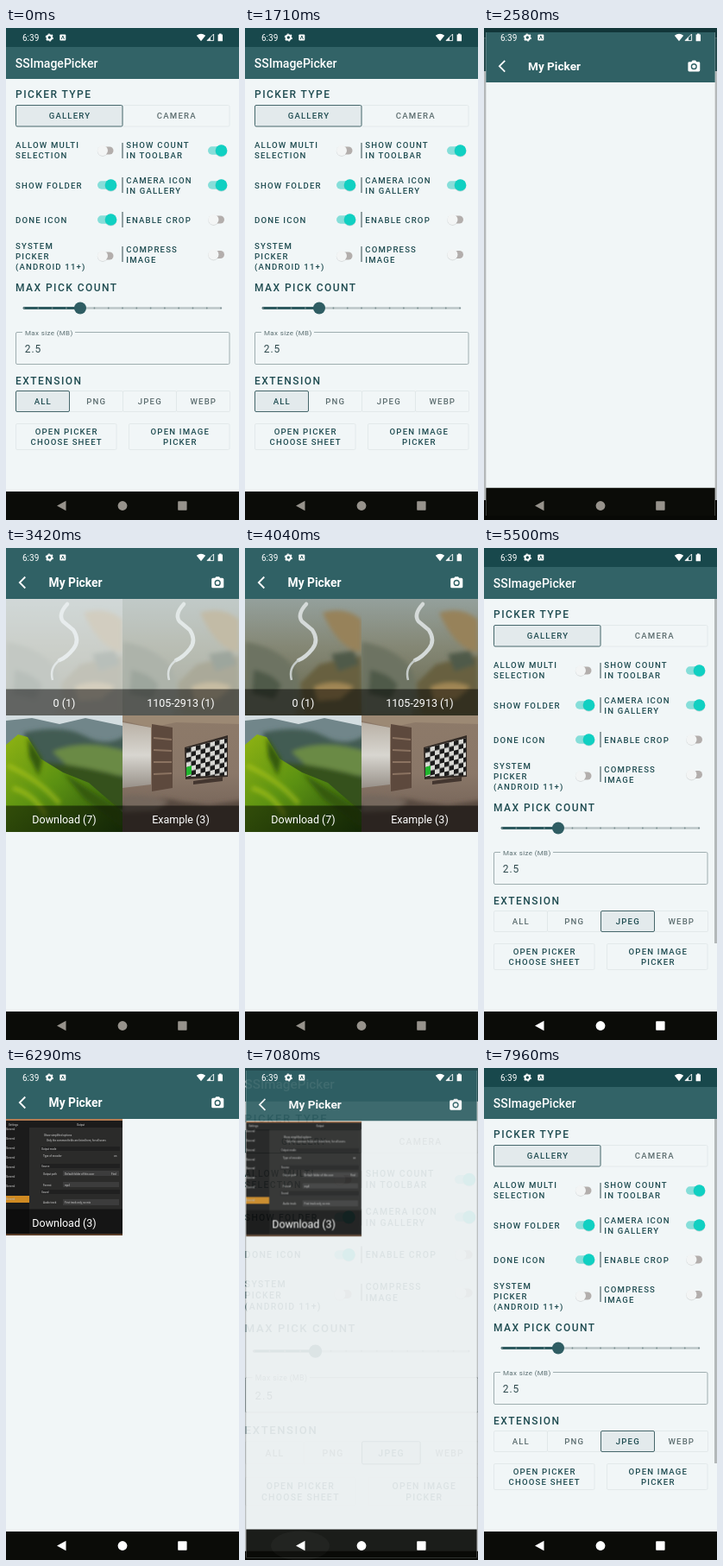
An HTML page for the animation above (8 s loop, 270 by 570 pixels).

```html
<!DOCTYPE html>
<html lang="en">
<head>
<meta charset="utf-8">
<title>SSImagePicker</title>
<style>
html, body { margin: 0; width: 100%; height: 100%; overflow: hidden; background: #0b0c08; }
svg { display: block; width: 100%; height: 100%; font-family: Roboto, sans-serif; }
.anim { animation: 8s linear infinite; }
.window { transform-origin: 135px 285px; }
.heading { font-size: 12px; font-weight: 500; letter-spacing: 1.45px; fill: #1f4c51; }
.label { font-size: 9.6px; font-weight: 500; letter-spacing: 1.17px; fill: #1f4c51; }
.mid { text-anchor: middle; }
.muted { fill: #5c6d6f; }
.title { font-size: 14px; font-weight: 500; fill: #fff; }
.caption { font-size: 12.5px; fill: #fff; text-anchor: middle; }
.tiny { font-size: 3px; font-weight: 500; fill: #b4b4b4; }

#settings { animation-name: settings; }
#picker { animation-name: picker; }
.shown { animation-name: shown; }
#all { animation-name: all; }
#jpeg { animation-name: jpeg; }
#bar { animation-name: bar; }
#nav { animation-name: nav; }
#ripple { animation-name: ripple; }
#first { animation-name: first; }
#second { animation-name: second; }
#photo0 { animation-name: photo0; }
#photo1 { animation-name: photo1; }
#photo2, #photo3 { animation-name: photo2; }
#photo4 { animation-name: photo4; }

/* Window motion: a short slow-in part, then a long slow-out part. */
@keyframes settings {
  0% { transform: scale(1); }
  30.5%, 73.125% { transform: scale(1); animation-timing-function: cubic-bezier(.3,0,.8,.15); }
  31.333%, 73.958% { transform: scale(1.018); animation-timing-function: cubic-bezier(.05,.7,.1,1); }
  35.5%, 54.74%, 78.125%, 87.99% { transform: scale(1.045); }
  54.75%, 88% { transform: scale(1.1); animation-timing-function: cubic-bezier(.3,0,.8,.15); }
  55.583%, 88.833% { transform: scale(1.06); animation-timing-function: cubic-bezier(.05,.7,.1,1); }
  59.75%, 93%, 100% { transform: scale(1); }
}
@keyframes picker {
  0% { transform: scale(.85); }
  30.5%, 73.125% { transform: scale(.85); animation-timing-function: cubic-bezier(.3,0,.8,.15); }
  31.333%, 73.958% { transform: scale(.91); animation-timing-function: cubic-bezier(.05,.7,.1,1); }
  35.5%, 78.125% { transform: scale(1); }
  54.75%, 88% { transform: scale(1); animation-timing-function: cubic-bezier(.3,0,.8,.15); }
  55.583%, 88.833% { transform: scale(.96); animation-timing-function: cubic-bezier(.05,.7,.1,1); }
  59.75%, 93%, 100% { transform: scale(.9); }
}
@keyframes shown {
  0%, 31.1%, 55.85%, 73.75%, 89.1%, 100% { opacity: 0; }
  31.75%, 55.2%, 74.4%, 88.45% { opacity: 1; }
}
@keyframes all { 0%, 65.5% { opacity: 1; } 66.8%, 100% { opacity: 0; } }
@keyframes jpeg { 0%, 65.5% { opacity: 0; } 66.8%, 100% { opacity: 1; } }
@keyframes bar {
  0%, 54.7%, 73%, 88% { opacity: 0; }
  55%, 70%, 88.3%, 100% { opacity: 1; }
}
@keyframes nav { 0%, 51.8% { fill: #97938c; } 53%, 100% { fill: #fff; } }
@keyframes ripple {
  0%, 51.6%, 55.5%, 84.9%, 88.8%, 100% { opacity: 0; }
  52.8%, 54%, 86.1%, 87.3% { opacity: .16; }
}
@keyframes first { 0%, 36.9%, 57.1%, 100% { opacity: 0; } 37%, 57% { opacity: 1; } }
@keyframes second { 0%, 76.1% { opacity: 0; } 76.2%, 100% { opacity: 1; } }
@keyframes photo0 { 0%, 41% { opacity: 0; } 46%, 100% { opacity: 1; } }
@keyframes photo1 { 0%, 40.7% { opacity: 0; } 44.7%, 100% { opacity: 1; } }
@keyframes photo2 { 0%, 37.5% { opacity: 0; } 41%, 100% { opacity: 1; } }
@keyframes photo4 { 0%, 76.2% { opacity: 0; } 78.3%, 100% { opacity: 1; } }
</style>
</head>
<body>
<svg viewBox="0 0 270 570" preserveAspectRatio="none">
  <defs>
    <linearGradient id="haze" x2="0" y2="1">
      <stop stop-color="#94a09c"/><stop offset=".4" stop-color="#858876"/><stop offset="1" stop-color="#66664c"/>
    </linearGradient>
    <linearGradient id="grass" x2="1" y2="1">
      <stop stop-color="#8fb313"/><stop offset=".45" stop-color="#5c9212"/><stop offset="1" stop-color="#28500d"/>
    </linearGradient>
    <linearGradient id="wall" x2="0" y2="1">
      <stop stop-color="#8d7a69"/><stop offset=".5" stop-color="#8a7768"/><stop offset="1" stop-color="#6a5a50"/>
    </linearGradient>
    <linearGradient id="window" x2="0" y2="1">
      <stop stop-color="#b9b1a6"/><stop offset=".5" stop-color="#d8d6d0"/><stop offset="1" stop-color="#989189"/>
    </linearGradient>
    <pattern id="checks" width="11" height="11" patternUnits="userSpaceOnUse">
      <path fill="#d8d8d4" d="M0 0h11v11H0z"/><path fill="#1b1b1b" d="M0 0h5.5v5.5H0zM5.5 5.5h5.5v5.5H5.5z"/>
    </pattern>
    <filter id="soft" x="-10%" y="-10%" width="120%" height="120%"><feGaussianBlur stdDeviation="2.5"/></filter>
    <clipPath id="cell"><path d="M0 0h135v135H0z"/></clipPath>
    <g id="valley">
      <path fill="url(#haze)" d="M0 0h135v135H0z"/>
      <g filter="url(#soft)">
        <path fill="#6d7362" d="M0 50Q30 54 50 72T58 135H0z"/>
        <path fill="#97825a" d="M90 16Q116 8 135 24V62Q108 58 90 16z"/>
        <path fill="#67613f" d="M135 66Q108 70 86 76L64 98 70 135H135z"/>
        <path fill="#4f5a4a" d="M10 82Q32 86 42 100L34 116 8 110zM100 64L126 60 132 76 108 84z"/>
        <path fill="#a28754" d="M80 102Q104 92 126 102L110 116 84 118z"/>
      </g>
      <path fill="none" stroke="#d5dad9" stroke-width="4.5" stroke-linecap="round" stroke-linejoin="round" d="M71 6Q60 18 66 26L78 36Q86 48 78 58T62 71"/>
      <path fill="none" stroke="#c5cbc8" stroke-width="2.5" d="M62 71Q50 80 54 94"/>
    </g>
    <g id="hill">
      <path fill="#d3dde0" d="M0 0h135v135H0z"/>
      <path fill="#71868a" d="M0 6L30 3 62 10 92 3 135 12V60H0z"/>
      <g filter="url(#soft)">
        <path fill="#435c52" d="M20 20Q66 10 92 24T140 22V90H40z"/>
        <path fill="#6b8a45" d="M54 42Q90 26 140 42V70L80 66z"/>
        <path fill="#34511f" d="M46 54Q90 58 140 72V112H60z"/>
      </g>
      <path fill="url(#grass)" d="M0 34L14 22 25 25 40 50 66 66 96 78 135 112V135H0z"/>
      <g filter="url(#soft)">
        <path fill="#345a10" d="M25 25L42 51 38 70 27 48zM66 66L135 112V130L90 96z"/>
        <path fill="none" stroke="#b6cc1e" stroke-width="5" opacity=".6" d="M2 58Q38 74 62 102M8 84Q34 92 46 116"/>
      </g>
    </g>
    <g id="room">
      <path fill="url(#wall)" d="M0 0h135v135H0z"/>
      <path fill="#9c8974" d="M0 0H135V10L62 8 34 14 0 6z"/>
      <path fill="url(#window)" d="M0 8L33 14V80L0 84z"/>
      <path fill="#5d493d" d="M34 10L58 14V84L34 88z"/>
      <path stroke="#8b7361" stroke-width="2" d="M36 26L57 28M36 40L57 41M36 54H57M36 68L57 67"/>
      <path fill="#322a25" d="M72 37L122 23V71L73 74z"/>
      <g transform="matrix(1 -.25 0 1 74 38)"><path fill="url(#checks)" d="M0 0H47V43L0 33z"/></g>
      <path fill="#20b52d" d="M74 60L80 58V68L74 70z"/>
      <path fill="#43362f" d="M82 76L116 71V76L82 80z"/>
      <g filter="url(#soft)">
        <path fill="#57493f" d="M-5 104Q30 90 68 100L100 104 140 98V140H-5z"/>
        <path fill="#75675d" d="M0 94Q24 90 54 100L38 110 0 112z"/>
      </g>
    </g>
    <g id="screen">
      <path fill="#2b2b2a" d="M0 0h135v135H0z"/>
      <path fill="#1b1b1b" d="M0 2H135V10H0zM0 10H27V133H0z"/>
      <path fill="#202020" d="M40 32H132V37H40zM40 52H132V57H40zM40 82H132V87H40z"/>
      <path fill="#3c3c3c" d="M66 60H131V66H66zM66 73H131V79H66zM66 93H131V100H66z"/>
      <path fill="#cf8a22" d="M0 89H27V97H0z"/>
      <path fill="#b47a50" d="M0 0H135V2H0zM0 133H135V135H0z"/>
      <g id="rows"></g>
    </g>
  </defs>

  <g id="settings" class="anim window">
    <path fill="#f1f6f7" d="M0 0H270V570H0z"/>
    <path fill="#18484c" d="M0 0H270V22H0z"/>
    <path fill="#326367" d="M0 22H270V59H0z"/>
    <path fill="#0b0c08" d="M0 537H270V570H0z"/>
    <text class="title" x="10.8" y="45.5">SSImagePicker</text>
    <g id="form"></g>
    <g id="all" class="anim"></g>
    <g id="jpeg" class="anim"></g>
    <path id="bar" class="anim" fill="#b3b8b9" d="M267 59H270V458H267z"/>
  </g>

  <path class="anim shown" fill-opacity=".25" d="M0 0H270V570H0z"/>

  <g class="anim shown"><g id="picker" class="anim window">
    <path fill="#f1f6f7" d="M0 0H270V570H0z"/>
    <path fill="#306165" d="M0 0H270V59H0z"/>
    <path fill="#0b0c08" d="M0 537H270V570H0z"/>
    <path fill="none" stroke="#fff" stroke-width="1.8" d="M22.3 33.5L15.8 40L22.3 46.5"/>
    <text class="title" x="49.6" y="45" style="font-weight:700;font-size:13.8px">My Picker</text>
    <path fill="#fff" d="M239.7 34.8H242.2L243.5 33.2H247L248.3 34.8H250.8Q252.3 34.8 252.3 36.3V44.8Q252.3 46.3 250.8 46.3H239.7Q238.2 46.3 238.2 44.8V36.3Q238.2 34.8 239.7 34.8z"/>
    <circle cx="245.2" cy="40.4" r="2.9" fill="#fff" stroke="#306165" stroke-width="1.4"/>
    <g id="first" class="anim"></g>
    <g id="second" class="anim"></g>
  </g></g>

  <g fill="#fff">
    <text x="19" y="14.7" font-size="10">6:39</text>
    <circle cx="50.3" cy="11" r="2.7" fill="none" stroke="#fff" stroke-width="2"/>
    <circle cx="50.3" cy="11" r="4" fill="none" stroke="#fff" stroke-width="1.2" stroke-dasharray="2 2.19"/>
    <rect x="62.3" y="7.5" width="7" height="7" rx="1"/>
    <path fill="none" stroke="#255559" d="M64.2 13L65.8 9L67.4 13"/>
    <path d="M220.8 8.8Q226 4.6 231.2 8.8L226 15.2z"/>
    <path fill="none" stroke="#fff" stroke-width=".9" d="M233 14.6L240.6 7V14.6z"/>
    <path d="M233 14.6L237 10.6V14.6zM245.6 7.5H247V6.4H249.6V7.5H251V15.2H245.6z"/>
  </g>
  <ellipse id="ripple" class="anim" cx="64" cy="553.5" rx="34" ry="17" fill="#fff" opacity="0"/>
  <g id="nav" class="anim">
    <path d="M59 553.5L69.5 547.8V559.2z"/>
    <circle cx="135" cy="553.5" r="5.4"/>
    <rect x="199.2" y="548.3" width="10.4" height="10.4" rx=".8"/>
  </g>
</svg>
<script>
const fill = (id, parts) => document.getElementById(id).innerHTML = parts.join('');
const text = (cls, x, y, str) => `<text class="${cls}" x="${x}" y="${y}">${str}</text>`;
const lines = (cls, x, y, ...rows) => rows.map((row, i) => text(cls, x, y + i * 12, row)).join('');
const box = (x, y, w, h, paint, stroke) =>
  `<rect x="${x}" y="${y}" width="${w}" height="${h}" rx="1.5" fill="${paint}" stroke="${stroke}" stroke-width=".9"/>`;
const faint = '#e1e8e9', dark = '#34595d', picked = '#e3eaec';

const toggle = (x, y, on) => on
  ? `<rect x="${x - 15}" y="${y - 4.7}" width="20" height="9.4" rx="4.7" fill="#86ded9"/>
     <circle cx="${x + .5}" cy="${y + .6}" r="7" fill="#98b4b5" opacity=".5"/><circle cx="${x + .5}" cy="${y}" r="6.8" fill="#10d0c2"/>`
  : `<rect x="${x - 5}" y="${y - 4.6}" width="16" height="9.2" rx="4.6" fill="#b3aeac"/>
     <circle cx="${x - 1.5}" cy="${y + .7}" r="6.2" fill="#9a9a9a" opacity=".3"/><circle cx="${x - 1.5}" cy="${y}" r="6" fill="#f3f5f5"/>`;

const extensions = ['ALL', 'PNG', 'JPEG', 'WEBP'];
const extension = (i, cls, paint, stroke) =>
  box(11.5 + i * 62, 420.5, 62, 24, paint, stroke) + text(`label mid ${cls}`, 42.8 + i * 62, 436, extensions[i]);

const ticks = Array.from({ length: 15 }, (_, i) =>
  `<circle cx="${21 + i * 16.29}" cy="324.5" r=".9" fill="#7d9194"/>`);

fill('form', [
  text('heading', 11, 81.3, 'PICKER TYPE'),
  text('heading', 11, 304.5, 'MAX PICK COUNT'),
  text('heading', 11, 412.5, 'EXTENSION'),
  box(135, 89.5, 124, 24.5, 'none', faint),
  box(11.5, 89.5, 123.5, 24.5, picked, dark),
  text('label mid', 74, 105.2, 'GALLERY'),
  text('label mid muted', 197.8, 105.2, 'CAMERA'),
  lines('label', 11, 139.3, 'ALLOW MULTI', 'SELECTION'),
  lines('label', 11, 185.7, 'SHOW FOLDER'),
  lines('label', 11, 225.7, 'DONE ICON'),
  lines('label', 11, 256.3, 'SYSTEM', 'PICKER', '(ANDROID 11+)'),
  lines('label', 139.3, 139.3, 'SHOW COUNT', 'IN TOOLBAR'),
  lines('label', 139.3, 179.7, 'CAMERA ICON', 'IN GALLERY'),
  lines('label', 139.3, 225.7, 'ENABLE CROP'),
  lines('label', 139.3, 259.7, 'COMPRESS', 'IMAGE'),
  ...[133, 173, 213, 253].map(y => `<path fill="#66797b" d="M134.3 ${y}h1.4v18h-1.4z"/>`),
  toggle(113.5, 142), toggle(121, 182, true), toggle(121, 222, true), toggle(113.5, 264),
  toggle(249, 142, true), toggle(249, 182, true), toggle(242, 222), toggle(242, 262.5),
  '<path stroke="#bcc6c8" stroke-width="2.6" stroke-linecap="round" d="M21 324.5H249"/>',
  '<path stroke="#2d5a5f" stroke-width="2.8" stroke-linecap="round" d="M21 324.5H86"/>',
  ...ticks,
  '<circle cx="86" cy="324.5" r="7" fill="#2f5d63"/>',
  box(11.5, 352.5, 247.5, 37, 'none', '#96a5a7'),
  '<path fill="#f1f6f7" d="M19 350H80V355H19z"/>',
  '<text x="22" y="355.8" font-size="8" letter-spacing=".35" fill="#5c7073">Max size (MB)</text>',
  '<text x="21.7" y="375.8" font-size="12" letter-spacing="1" fill="#2f4a4e">2.5</text>',
  ...extensions.map((_, i) => extension(i, 'muted', 'none', faint)),
  box(11.5, 458.5, 116.5, 30, 'none', faint),
  box(142.5, 458.5, 116.5, 30, 'none', faint),
  lines('label mid', 70.2, 471.3, 'OPEN PICKER', 'CHOOSE SHEET'),
  lines('label mid', 201.8, 471.3, 'OPEN IMAGE', 'PICKER')
]);
fill('all', [extension(0, '', picked, dark)]);
fill('jpeg', [extension(2, '', picked, dark)]);

const folder = (i, col, row, photo, name) => `<g transform="translate(${col * 135} ${59 + row * 135})">
  <g clip-path="url(#cell)"><use id="photo${i}" class="anim" href="#${photo}"/></g>
  <path fill-opacity=".5" d="M0 104.5H135V135H0z"/>${text('caption', 67.5, 125, name)}</g>`;

const tiny = (x, y, str) => text('tiny', x, y, str);
fill('rows', [
  tiny(3, 7.5, 'Settings'), tiny(82, 7.5, 'Output'),
  tiny(44, 20, 'Show simplified options'), tiny(47, 25.5, 'Only the common fields are listed here, for all users'),
  tiny(41, 35.5, 'Output mode'), tiny(43, 44, 'Type of encoder'), tiny(125, 44, 'on'),
  tiny(41, 55.5, 'Source'), tiny(43, 64.5, 'Output path'), tiny(68, 64.5, 'Default folder of this user'), tiny(122, 64.5, 'Find'),
  tiny(43, 77.5, 'Format'), tiny(68, 77.5, 'mp4'),
  tiny(41, 85.5, 'Sound'), tiny(43, 98, 'Audio track'), tiny(68, 98, 'First track only, no mix'),
  ...[13, 24, 35, 46, 57, 68, 79, 94].map(y => tiny(0, y, 'General'))
]);
fill('first', [
  folder(0, 0, 0, 'valley', '0 (1)'), folder(1, 1, 0, 'valley', '1105-2913 (1)'),
  folder(2, 0, 1, 'hill', 'Download (7)'), folder(3, 1, 1, 'room', 'Example (3)')
]);
fill('second', [folder(4, 0, 0, 'screen', 'Download (3)')]);
</script>
</body>
</html>
```
